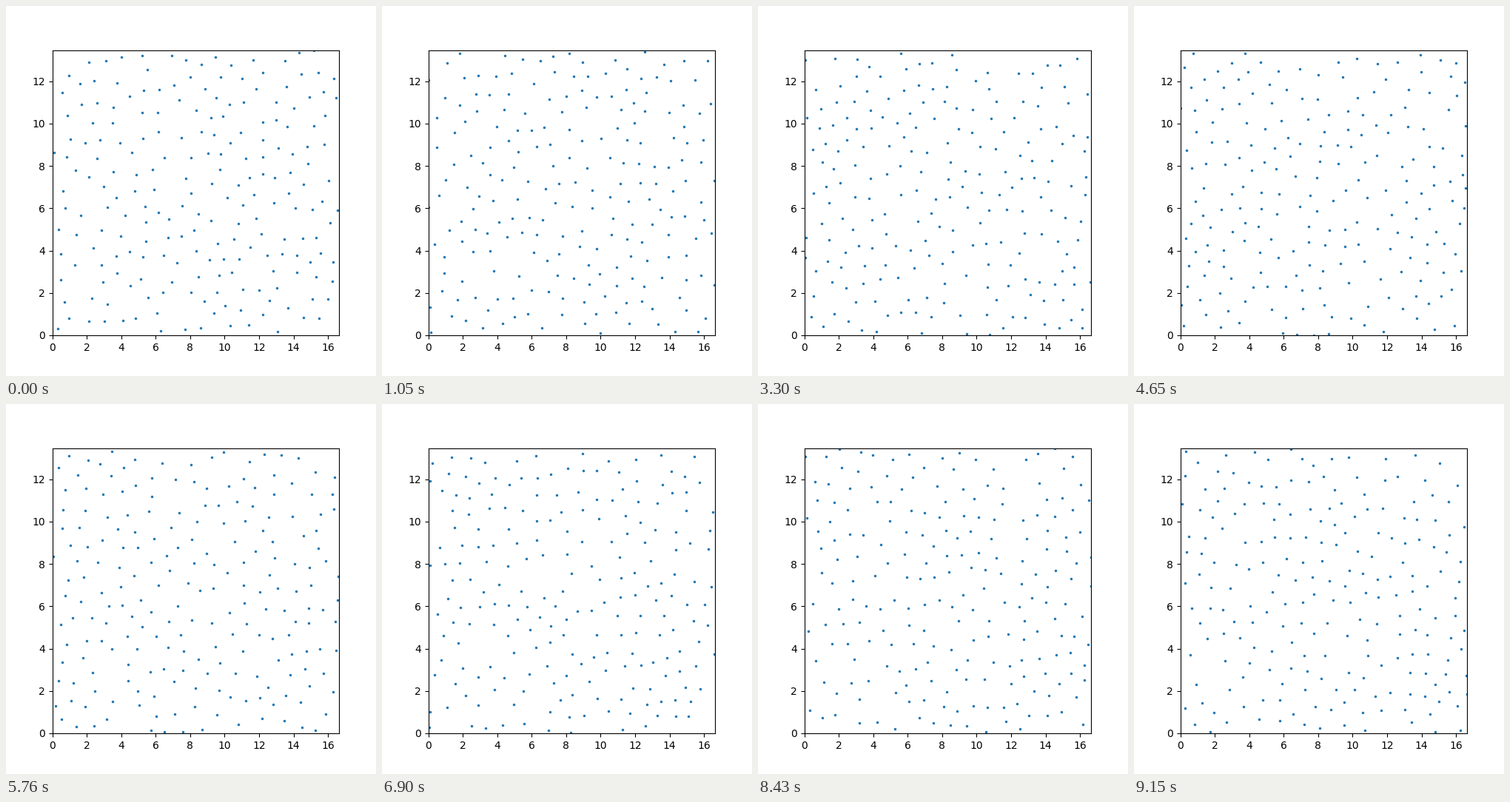
Animation of 500x500 px, one loop 9180 ms. Source, as a matplotlib script:

```python
import numpy as np
import matplotlib.pyplot as plt
from matplotlib.animation import FuncAnimation

FRAMES, INTERVAL = 306, 30
COLS, ROWS, GAP = 15, 14, 1.10936    # triangular starting lattice
CORE, CUTOFF = 0.74, 1.2             # soft-disk size and force range
DT, SUBSTEPS, WARMUP = 0.0034, 5, 1000

N = COLS * ROWS
BOX = np.array([COLS * GAP, ROWS * GAP * np.sqrt(3) / 2])
I, J = np.triu_indices(N, 1)


def forces(pos):
    """Repulsion from (CORE / r)**12 with periodic images."""
    d = pos[I] - pos[J]
    d -= BOX * np.round(d / BOX)
    r2 = (d * d).sum(axis=1)
    near = np.flatnonzero(r2 < CUTOFF ** 2)
    d, r2 = d[near], r2[near]
    f = (12 * (CORE ** 2 / r2) ** 6 / r2)[:, None] * d
    i, j = I[near], J[near]
    return np.column_stack([
        np.bincount(i, f[:, k], N) - np.bincount(j, f[:, k], N)
        for k in (0, 1)])


def step(pos, vel, acc):
    """One velocity Verlet step."""
    vel = vel + acc * DT / 2
    pos = (pos + vel * DT) % BOX
    acc = forces(pos)
    return pos, vel + acc * DT / 2, acc


def simulate():
    rng = np.random.default_rng(7)
    row, col = np.divmod(np.arange(N), COLS)
    pos = np.column_stack([(col + 0.5 * (row % 2)) * GAP,
                           row * GAP * np.sqrt(3) / 2])
    vel = rng.normal(size=(N, 2))
    vel -= vel.mean(axis=0)
    acc = forces(pos)
    for _ in range(WARMUP):
        pos, vel, acc = step(pos, vel, acc)
        vel /= np.sqrt((vel ** 2).mean())     # hold unit temperature
    track = [pos]
    for _ in range(FRAMES - 1):
        for _ in range(SUBSTEPS):
            pos, vel, acc = step(pos, vel, acc)
        track.append(pos)
    return track


track = simulate()

fig, ax = plt.subplots(figsize=(5, 5), dpi=100)
ax.set_xlim(0, BOX[0])
ax.set_ylim(0, BOX[1])
dots, = ax.plot([], [], '.', markersize=3)


def draw(frame):
    dots.set_data(track[frame][:, 0], track[frame][:, 1])
    return dots,


anim = FuncAnimation(fig, draw, frames=FRAMES, interval=INTERVAL,
                     repeat=True, repeat_delay=0)
plt.show()
```
